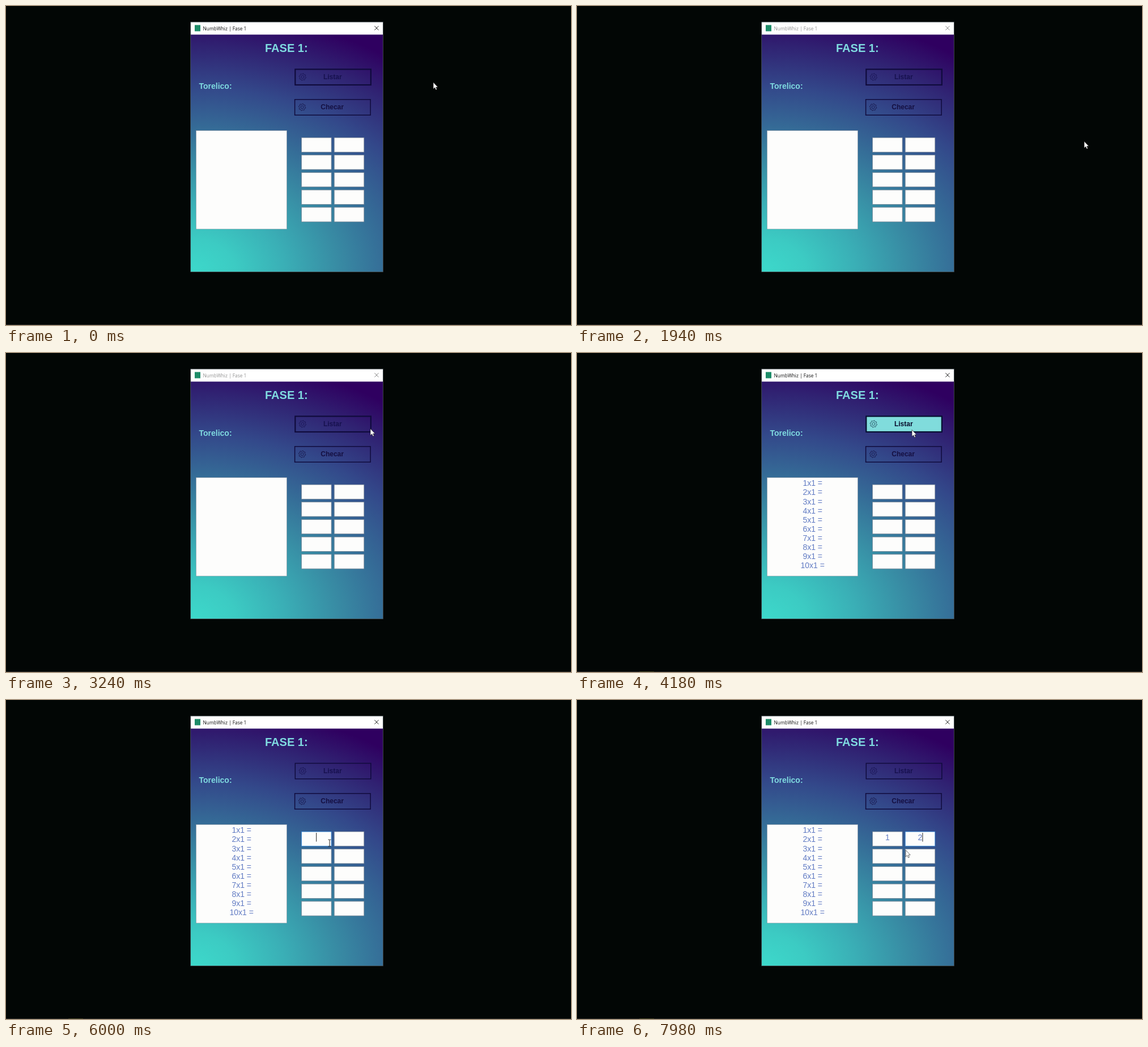
These frames come from a looping animation (997 px wide and 562 px high, 8 s). An HTML page:

```html
<!DOCTYPE html>
<html lang="pt">
<head>
<meta charset="utf-8">
<title>NumbWhiz</title>
<style>
  html, body { margin: 0; width: 100%; height: 100%; overflow: hidden; background: #020605; }
  svg { display: block; position: absolute; left: 0; top: 0; }
  text { font-family: "Liberation Sans", Arial, sans-serif; }
  .window {
    position: absolute; left: 326px; top: 50px; width: 339px; height: 418px;
    background: radial-gradient(662px 486px at 0 100%,
      #3dd9cb 0, #3ccbc3 12%, #3aafb6 25%, #388ca4 39%, #356c97 52%, #33488a 67%, #302272 82%, #2f0060 94%);
  }
  .heading { font-weight: bold; fill: #7fdbe0; }
  .label { font-weight: bold; font-size: 12px; text-anchor: middle; }
  .math { font-size: 14px; fill: #627cc4; text-anchor: middle; }
</style>
</head>
<body>
<div class="window"></div>
<svg id="stage" width="997" height="562" viewBox="0 0 997 562"></svg>
<script>
const stage = document.getElementById('stage');

function add(parent, tag, attrs = {}, text = '') {
  const el = document.createElementNS('http://www.w3.org/2000/svg', tag);
  for (const key in attrs) el.setAttribute(key, attrs[key]);
  el.textContent = text;
  parent.appendChild(el);
  return el;
}
const show = (el, on) => el.setAttribute('visibility', on ? 'visible' : 'hidden');

// Desktop edge, title bar and window outline
add(stage, 'rect', { x: 0, y: 561, width: 997, height: 1, fill: '#292624' });
const taskMark = add(stage, 'rect', { x: 110, y: 561, width: 26, height: 1, fill: '#4a4928' });
add(stage, 'rect', { x: 326, y: 28.4, width: 339, height: 22, fill: '#fff' });
add(stage, 'rect', {
  x: 325.7, y: 28.2, width: 339.6, height: 440.2, fill: 'none',
  stroke: '#6d7880', 'stroke-width': 0.8, 'stroke-opacity': 0.7
});
add(stage, 'rect', { x: 333, y: 33.5, width: 10, height: 11, fill: '#1d8c68' });
const caption = add(stage, 'text', {
  x: 347.5, y: 42.5, 'font-size': 8.4, style: 'font-family:"Open Sans",sans-serif'
}, 'NumbWhiz | Fase 1');
const closeMark = add(stage, 'path', { d: 'M650.3 35.3l7.2 7.2m0-7.2l-7.2 7.2', 'stroke-width': 1 });

add(stage, 'text', { class: 'heading', x: 457, y: 81, 'font-size': 20 }, 'FASE 1:');
add(stage, 'text', { class: 'heading', x: 340.5, y: 145.5, 'font-size': 14 }, 'Torelico:');

function gearPath(cx, cy) {
  const points = [];
  for (let i = 0; i < 32; i++) {
    const r = i % 4 < 2 ? 6.2 : 4.9, a = (i + 0.5) * Math.PI / 16;
    points.push((cx + r * Math.cos(a)).toFixed(2) + ' ' + (cy + r * Math.sin(a)).toFixed(2));
  }
  return 'M' + points.join('L') + 'Z';
}

function makeButton(x, y, label, ink) {
  const g = add(stage, 'g');
  const box = add(g, 'rect', { x, y, width: 133.5, height: 27.5 });
  const gear = add(g, 'g', { fill: 'none', 'stroke-width': 0.8 });
  add(gear, 'path', { d: gearPath(x + 13, y + 13.5) });
  add(gear, 'circle', { cx: x + 13, cy: y + 13.5, r: 2.5 });
  const text = add(g, 'text', { class: 'label', x: x + 66, y: y + 17.3 }, label);
  return {
    x, y,
    paint(hover, thick) {
      box.setAttribute('fill', hover ? '#80dcdc' : 'none');
      box.setAttribute('stroke', hover ? '#060f30' : '#100b3c');
      box.setAttribute('stroke-width', thick ? 2.2 : 1.5);
      gear.setAttribute('stroke', hover ? '#17354c' : ink);
      text.setAttribute('fill', hover ? '#080b2c' : ink);
    }
  };
}
const listButton = makeButton(510.3, 111.5, 'Listar', '#17114f');
const checkButton = makeButton(509.6, 164.7, 'Checar', '#151042');

// Exercise list and answer fields
add(stage, 'rect', { x: 335.5, y: 219.5, width: 160, height: 173.5, fill: '#fdfdfc', stroke: '#8b96a2', 'stroke-width': 0.6 });
const list = add(stage, 'g');
for (let n = 1; n <= 10; n++)
  add(list, 'text', { class: 'math', x: 415.7, y: 234.3 + (n - 1) * 16.1 }, n + 'x1 =');

const cells = [];
for (let i = 0; i < 10; i++)
  cells.push(add(stage, 'rect', {
    x: 521.5 + (i % 2) * 57.7, y: 232 + Math.floor(i / 2) * 30.7,
    width: 52.6, height: 25.3, fill: '#fdfdfc', 'stroke-width': 0.8
  }));
const answers = [547.8, 605.4].map((x, i) => add(stage, 'text', { class: 'math', x, y: 246.7 }, i + 1));
const caret = add(stage, 'rect', { y: 234, width: 1, height: 15.5, fill: '#222' });

const arrow = add(stage, 'path', {
  d: 'M0 .4V12.2L2.7 9.7L4.5 13.8L6.4 13L4.7 9H8.2Z',
  fill: '#fff', stroke: '#111', 'stroke-width': 0.6
});
const beam = add(stage, 'path', {
  d: 'M-2.5 -6H-.6L0 -5.4L.6 -6H2.5M0 -5.4V5.4M-2.5 6H-.6L0 5.4L.6 6H2.5',
  fill: 'none', stroke: '#222', 'stroke-width': 1
});

// Pointer path: time, x, y
const path = [
  [0, 754, 134], [80, 754, 134], [620, 895, 238], [2240, 895, 238], [2760, 752, 178],
  [3240, 643, 133], [3500, 591, 135], [4420, 591, 135], [4860, 582, 205], [5260, 571, 252],
  [6640, 571, 252], [6960, 598, 249], [7400, 598, 249], [7760, 580, 264], [8000, 580, 264]
];
const LOOP = 8000, BLUR = 720, LIST = 3780, FOCUS_1 = 5600, TYPE_1 = 6500, FOCUS_2 = 7100, TYPE_2 = 7700;

function pointerAt(t) {
  const i = path.findIndex((p, k) => k && t <= p[0]);
  const [t0, x0, y0] = path[i - 1], [t1, x1, y1] = path[i];
  const u = (t - t0) / (t1 - t0), e = u * u * (3 - 2 * u);
  return [x0 + (x1 - x0) * e, y0 + (y1 - y0) * e];
}
const inside = (x, y, left, top, w, h) => x > left && x < left + w && y > top && y < top + h;

function draw(t) {
  const [x, y] = pointerAt(t);
  const active = t < BLUR || t >= LIST;
  caption.setAttribute('fill', active ? '#111' : '#929292');
  closeMark.setAttribute('stroke', active ? '#222' : '#888');
  show(taskMark, t >= LIST);
  show(list, t >= LIST);

  for (const b of [listButton, checkButton])
    b.paint(inside(x, y, b.x, b.y, 132, 27.5), b === listButton && t < FOCUS_1);

  const focus = t < FOCUS_1 ? -1 : t < FOCUS_2 ? 0 : 1;
  cells.forEach((c, i) => c.setAttribute('stroke', i === focus ? '#2f86d8' : '#7b8794'));
  show(answers[0], t >= TYPE_1);
  show(answers[1], t >= TYPE_2);

  const since = [FOCUS_1, TYPE_1, FOCUS_2, TYPE_2].filter(s => s <= t).pop();
  show(caret, focus >= 0 && (t - since) % 1060 < 530);
  caret.setAttribute('x', t < TYPE_1 ? 547.2 : t < FOCUS_2 ? 551.8 : t < TYPE_2 ? 604.9 : 609.4);

  const overCell = inside(x, y, 521.5, 232, 52.6, 25.3) || inside(x, y, 579.2, 232, 52.6, 25.3);
  show(arrow, !overCell);
  show(beam, overCell);
  (overCell ? beam : arrow).setAttribute('transform', `translate(${x.toFixed(1)} ${y.toFixed(1)})`);
}

const start = performance.now();
function tick() {
  draw((performance.now() - start) % LOOP);
  requestAnimationFrame(tick);
}
tick();
</script>
</body>
</html>
```
